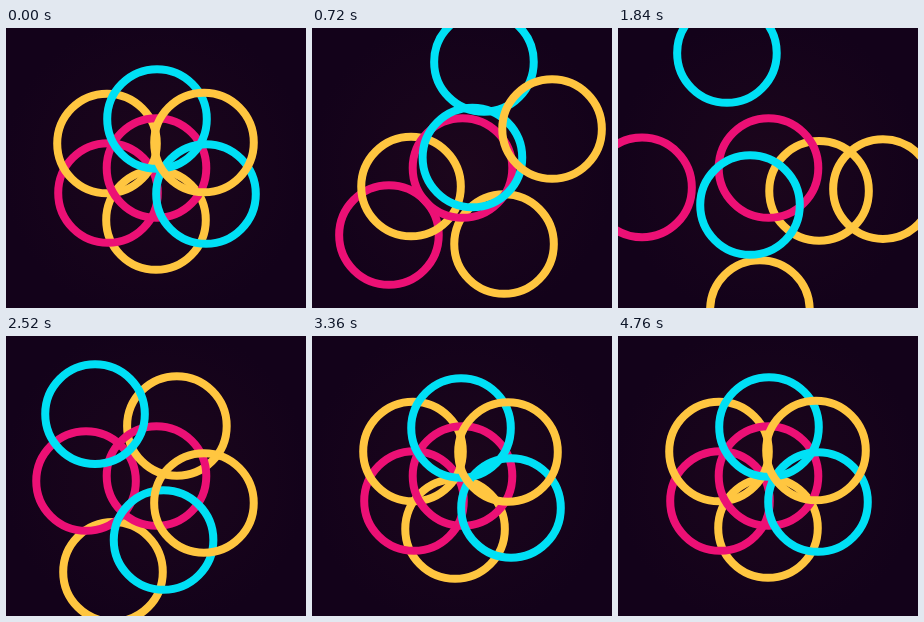
An HTML page that plays this animation: 300x280 px, repeating every 4.8 s.

```html
<!DOCTYPE html>
<html lang="en">
<head>
<meta charset="utf-8">
<title>Rings</title>
<style>
  html, body { margin: 0; width: 100%; height: 100%; overflow: hidden; background: #14021a; }
  svg { display: block; width: 300px; height: 280px; background: radial-gradient(circle at 50% 50%, #1c061c, #13021a 75%); }
  circle { fill: none; stroke-width: 8; }
</style>
</head>
<body>
<svg id="stage" viewBox="0 0 300 280"></svg>
<script>
const LOOP = 4800;
const TIMES = [0, 720, 1840, 2520, 3360, 3500];
const CENTER = [150.5, 140];
const YELLOW = '#ffc640', CYAN = '#00e0f5', PINK = '#ec1075';
const TAU = Math.PI * 2;

// Back to front. Each ring circles its own hub through the listed stops and returns home.
const RINGS = [
  { color: YELLOW, hub: [152, 238], dir: 1, stops: [[150, 192], [192, 216], [142, 282], [107, 236], [143, 193]] },
  { color: PINK, hub: [58, 175], dir: 1, stops: [[102, 165], [77, 207], [24, 159.5], [80, 145], [102, 165]] },
  { color: YELLOW, hub: [150.5, 140], dir: -1, stops: [[101, 115.5], [99, 158.5], [201, 163], [171, 90], [101, 115.5]] },
  { color: PINK },
  { color: CYAN, hub: [135.5, 65], dir: -1, stops: [[151, 91], [172, 34], [109, 25], [89, 78], [149, 92]] },
  { color: CYAN, hub: [169.5, 167], dir: -1, stops: [[200, 166], [160.5, 129.5], [132, 177], [157.5, 204], [199, 172]] },
  { color: YELLOW, hub: [229.5, 140.6], dir: 1, stops: [[198, 114.5], [240, 101], [265, 161], [198, 167], [196, 116]] }
];

// Monotone cubic through the values at TIMES, at rest on both ends.
function curve(values) {
  const n = values.length;
  const step = i => TIMES[i + 1] - TIMES[i];
  const rate = i => (values[i + 1] - values[i]) / step(i);
  const slopes = values.map((_, i) => {
    if (i === 0 || i === n - 1) return 0;
    const a = rate(i - 1), b = rate(i);
    if (a * b <= 0) return 0;
    const wa = 2 * step(i) + step(i - 1), wb = step(i) + 2 * step(i - 1);
    return (wa + wb) / (wa / a + wb / b);
  });
  return t => {
    if (t >= TIMES[n - 1]) return values[n - 1];
    let i = 0;
    while (t >= TIMES[i + 1]) i++;
    const h = step(i), u = (t - TIMES[i]) / h, v = 1 - u;
    return v * v * ((1 + 2 * u) * values[i] + u * h * slopes[i])
         + u * u * ((1 + 2 * v) * values[i + 1] - v * h * slopes[i + 1]);
  };
}

function orbit({ hub: [hx, hy], dir, stops }) {
  const points = [...stops, stops[0]];
  const raw = points.map(([x, y]) => Math.atan2(y - hy, x - hx));
  const angles = [raw[0]];
  for (let i = 1; i < raw.length; i++) {
    const turn = (dir * (raw[i] - raw[i - 1]) + 2 * TAU) % TAU;
    angles.push(angles[i - 1] + dir * turn);
  }
  const angle = curve(angles);
  const radius = curve(points.map(([x, y]) => Math.hypot(x - hx, y - hy)));
  return t => {
    const a = angle(t), r = radius(t);
    return [hx + r * Math.cos(a), hy + r * Math.sin(a)];
  };
}

const stage = document.getElementById('stage');
const rings = RINGS.map(ring => {
  const el = document.createElementNS(stage.namespaceURI, 'circle');
  el.setAttribute('r', 49.8);
  el.setAttribute('stroke', ring.color);
  stage.append(el);
  return { el, at: ring.hub ? orbit(ring) : () => CENTER };
});

function draw(t) {
  for (const { el, at } of rings) {
    const [x, y] = at(t);
    el.setAttribute('cx', x.toFixed(2));
    el.setAttribute('cy', y.toFixed(2));
  }
}

const start = performance.now();
function tick() {
  draw((performance.now() - start) % LOOP);
  requestAnimationFrame(tick);
}
draw(0);
requestAnimationFrame(tick);
</script>
</body>
</html>
```
